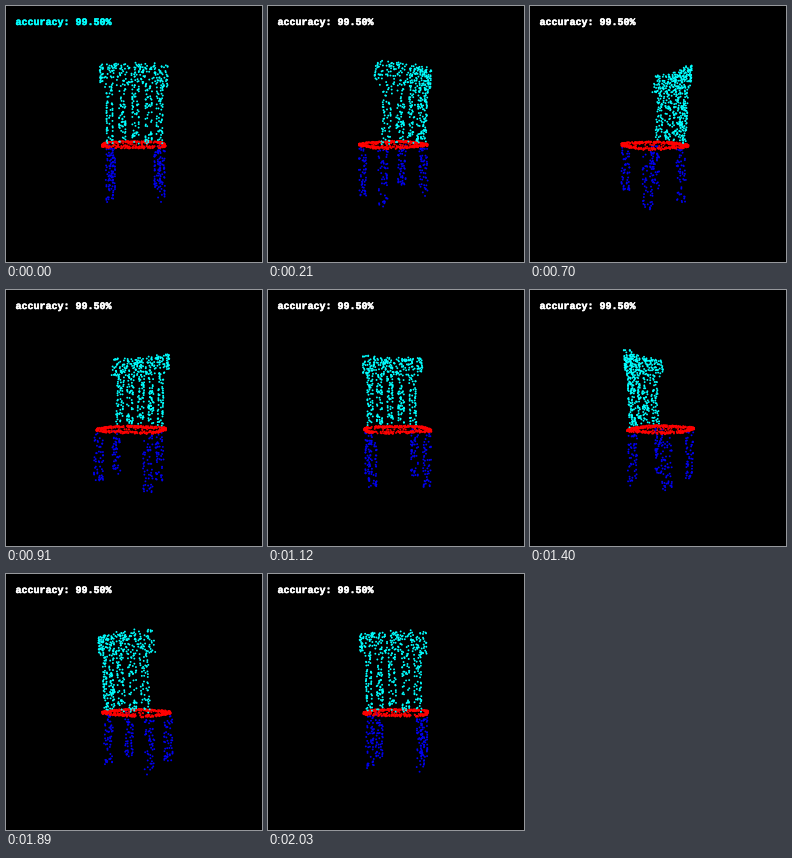
A matplotlib script that plays this animation: 256 by 256 pixels, repeating every 2.1 s.

```python
import numpy as np
import matplotlib.pyplot as plt
from matplotlib.animation import FuncAnimation
from matplotlib.patheffects import withStroke

SIZE, DPI = 256, 64
FRAMES, INTERVAL = 30, 70
CENTER_X, HORIZON, CAMERA = 127.8, 115, 240
CYAN, RED, BLUE = (0, 1, 1), (1, 0, 0), (0, 0, 0.94)

rng = np.random.default_rng(7)


def post(u, w, top, bottom, half_u, half_w, n):
    """Random points on the side faces of an upright bar."""
    a, b = rng.uniform(-1, 1, (2, n))
    side = rng.random(n) < half_w / (half_u + half_w)
    du = np.where(side, np.sign(a), a) * half_u
    dw = np.where(side, b, np.sign(b)) * half_w
    return np.c_[u + du, w + dw, rng.uniform(top, bottom, n)]


def bend(points):
    """Curve the back rest around the sitter and lean it backwards."""
    u, w, y = points.T
    lean = (22 - y) / 75
    return np.c_[u, w + 21 + 4.5 * lean - 0.0105 * u**2, y]


def seat(n_rim, n_face):
    n = n_rim + n_face
    t = rng.uniform(0, 2 * np.pi, n)
    r = np.r_[rng.uniform(0.96, 1, n_rim), np.sqrt(rng.random(n_face))]
    c, s = np.cos(t), np.sin(t)
    r = r / (abs(c)**3.5 + abs(s)**3.5)**(1 / 3.5)
    return np.c_[31.3 * r * c, -4.5 + 28.5 * r * s, rng.uniform(22.7, 24.9, n)]


rail = bend(post(0, 0, -52, -32, 31.5, 3.2, 220))
slats = [bend(post(u, 0, -32, 21, 2.9, 1.5, 58))
         for u in (-22.5, -10.5, 1.6, 13.6, 24)]
legs = [post(u, w, 26, 76, 3.2, 3.2, 54)
        for u, w in ((-24, -24), (26, -24), (-23, 12), (26, 12))]

parts = [(rail, CYAN), *((s, CYAN) for s in slats),
         (seat(380, 45), RED), *((g, BLUE) for g in legs)]
cloud = np.vstack([p for p, _ in parts])
colors = np.vstack([np.tile(c, (len(p), 1)) for p, c in parts])

fig = plt.figure(figsize=(SIZE / DPI, SIZE / DPI), dpi=DPI, facecolor="black")
ax = fig.add_axes([0, 0, 1, 1])
ax.set(xlim=(0, SIZE), ylim=(SIZE, 0))
ax.axis("off")

px = 72 / DPI
dots = ax.scatter(*np.zeros((2, len(cloud))), s=(1.9 * px)**2, linewidths=0)
label = ax.text(9.5, 19, "accuracy: 99.50%", family="Liberation Mono",
                weight="bold", size=10 * px, va="baseline")


def draw(i):
    angle = 2 * np.pi * i / FRAMES
    c, s = np.cos(angle), np.sin(angle)
    u, w, y = cloud.T
    depth = w * c - u * s
    k = CAMERA / (CAMERA - depth)
    xy = np.c_[CENTER_X + (u * c + w * s) * k, HORIZON + y * k]
    order = np.argsort(depth)
    dots.set_offsets(xy[order])
    dots.set_facecolors(colors[order])
    # The label flashes cyan at the start of each turn.
    ink = CYAN if i == 0 else "white"
    label.set_color(ink)
    label.set_path_effects([withStroke(linewidth=0.5 * px, foreground=ink)])
    return dots, label


anim = FuncAnimation(fig, draw, frames=FRAMES, interval=INTERVAL,
                     repeat=True, repeat_delay=0)
plt.show()
```
